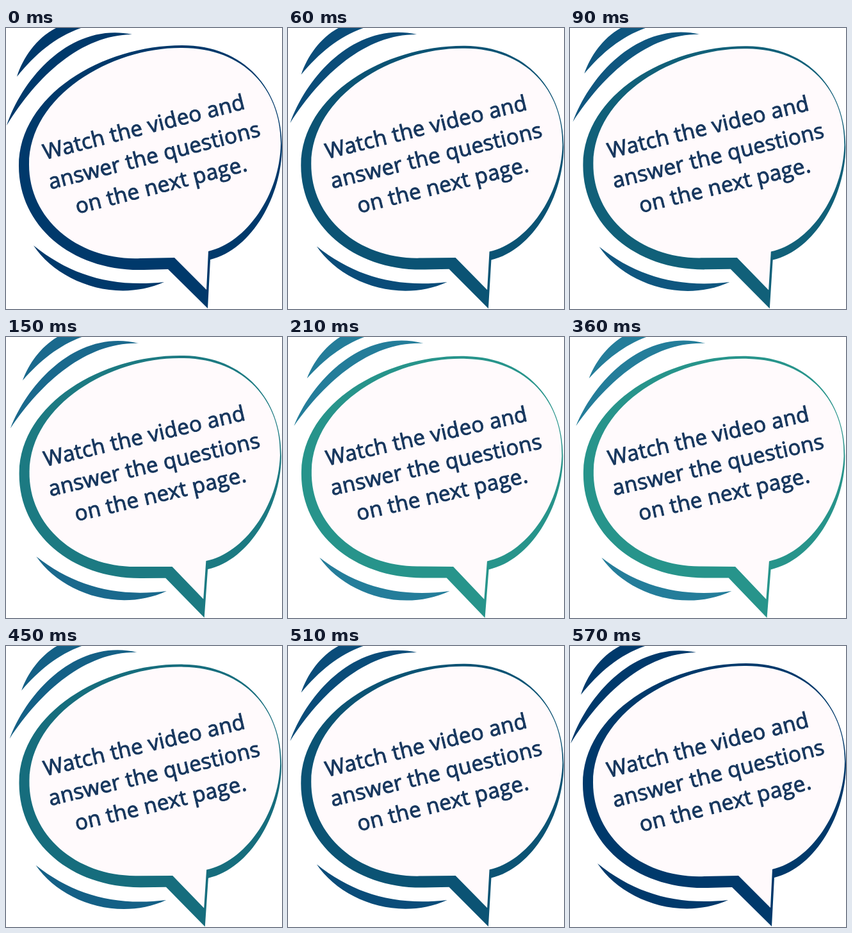
Recreate the animation shown at these times as an HTML page. Size 431 px wide and 438 px high, loop 0.6 s.

```html
<!DOCTYPE html>
<html lang="en">
<head>
<meta charset="utf-8">
<title>Speech bubble</title>
<style>
html, body { margin: 0; width: 100%; height: 100%; overflow: hidden; background: #fff; }
svg { display: block; }
text {
  font: 400 33.3px "Open Sans", "Noto Sans", sans-serif;
  letter-spacing: 0.35px;
  text-anchor: middle;
  fill: #17375e;
  stroke: #17375e;
  stroke-width: 1;
}
</style>
</head>
<body>
<svg width="431" height="438" viewBox="0 0 431 438">
  <g id="upper">
    <path d="M17 76C28 41 56 3 99-8L120-1C78 13 46 40 17 76Z"/>
    <path d="M1 152C27 75 103-9 197 10C117 11 49 74 1 152Z"/>
  </g>
  <path id="lower" d="M43 339C80 395 170 430 247 396C165 405 100 385 43 339Z"/>
  <g id="bubble">
    <path d="M275 27C150 27 20 105 20 215C20 310 105 380 215 377L253 376L315 437L319 361C385 345 431 260 431 185C431 95 372 27 275 27Z"/>
    <path fill="#fffafc" d="M275 31C165 30 36 105 36 213C36 300 115 363 210 359L263 358L313 408L316 348C375 335 428 260 429 180C429 95 371 31 275 31Z"/>
    <g transform="translate(233.4 210) rotate(-14.2)">
      <text x="-4" y="-47">Watch the video and</text>
      <text x="1">answer the questions</text>
      <text y="47.5">on the next page.</text>
    </g>
  </g>
</svg>
<script>
const NAVY = [0, 57, 107], GREEN = [50, 174, 148], BLUE = [46, 144, 168];
const STEP = 30, STEPS = 20;

// Each part turns and shrinks about its own centre while its colour shifts.
const parts = [
  { id: "upper", turn: 4.4, scale: 0.988, cx: 242, cy: 248, color: BLUE },
  { id: "lower", turn: -1.5, scale: 0.988, cx: 350, cy: 177, color: BLUE },
  { id: "bubble", turn: 2, scale: 0.99, cx: 216, cy: 190, color: GREEN },
];

const mix = (a, b, p) => a.map((v, i) => Math.round(v + (b[i] - v) * p));

function draw(now) {
  const k = Math.floor(now / STEP) % STEPS;
  const p = Math.min(k, STEPS - 1 - k) / (STEPS / 2 - 1);
  for (const { id, turn, scale, cx, cy, color } of parts) {
    const el = document.getElementById(id);
    el.setAttribute("transform",
      `translate(${cx} ${cy}) rotate(${turn * p}) scale(${1 + (scale - 1) * p}) translate(${-cx} ${-cy})`);
    el.setAttribute("fill", `rgb(${mix(NAVY, color, p)})`);
  }
}

const start = performance.now();
function loop() {
  draw(performance.now() - start);
  requestAnimationFrame(loop);
}
loop();
</script>
</body>
</html>
```
